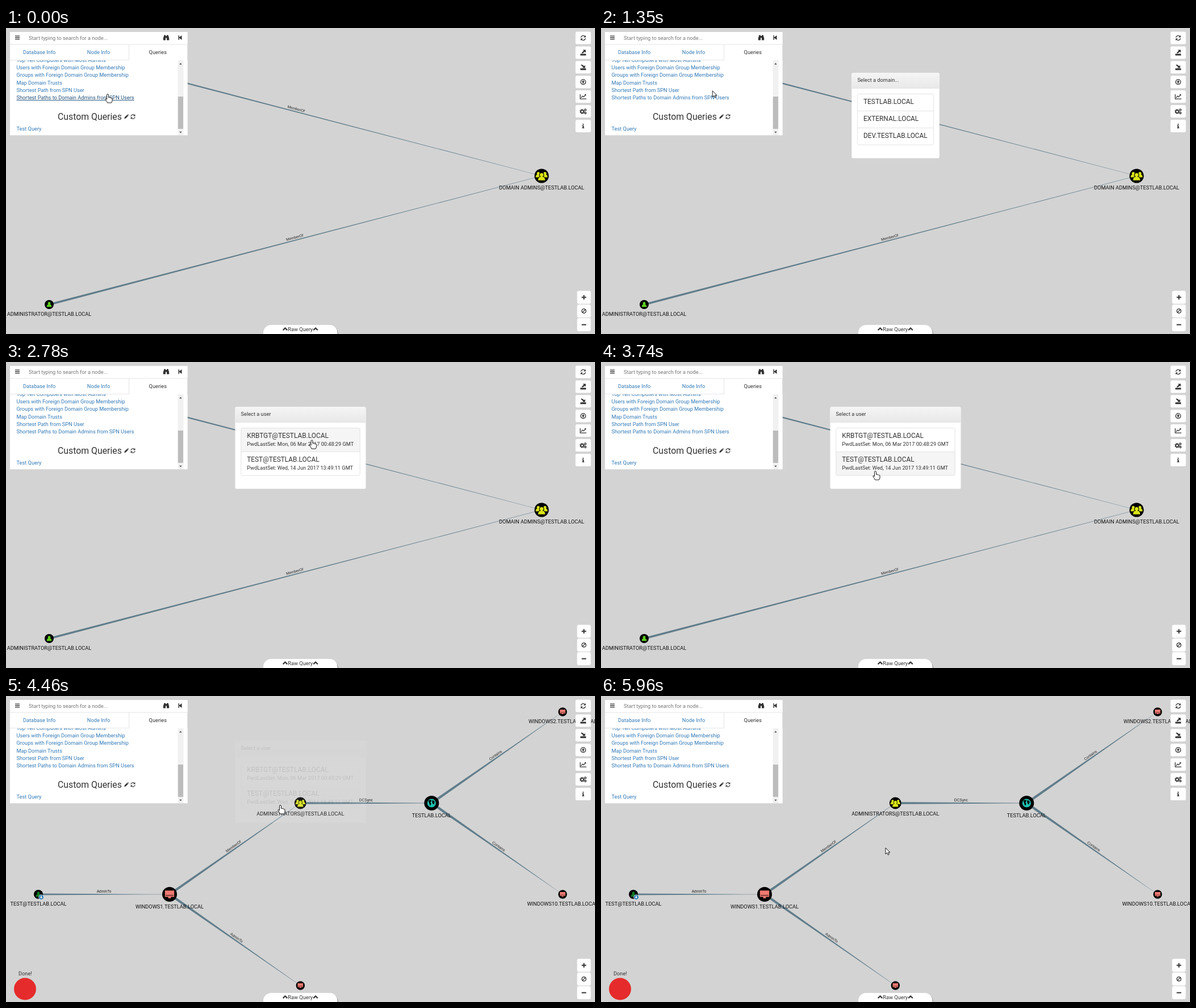
Recreate the animation shown at these times as an HTML page. Size 1037 by 540 pixels, loop 6040 ms.

```html
<!DOCTYPE html>
<html lang="en">
<head>
<meta charset="utf-8">
<title>Graph query</title>
<style>
  html, body { margin: 0; width: 100%; height: 100%; overflow: hidden; background: #d3d3d3; }
  svg { display: block; font: 9.24px Roboto, sans-serif; fill: #333; }
  .mid { text-anchor: middle; }
  .link { fill: #337ab7; }
  .link.hover { fill: #23527c; text-decoration: underline; }
  .edge { fill: #607d8b; }
  .edge-label { font: 6.6px "Liberation Sans", Arial, sans-serif; text-anchor: middle; fill: #222; }
  .node-label { text-anchor: middle; fill: #111; }
  .line { fill: none; stroke: #333; stroke-width: 1.3; }
  .rule { fill: none; stroke: #ddd; stroke-width: .8; }
  .row { fill: #fff; }
  .row.hover { fill: #f5f5f5; }
  .item { font-size: 11.88px; }
  .cursor { fill: #fff; stroke: #000; stroke-width: .9; stroke-linejoin: round; }
</style>
</head>
<body>
<svg id="stage" width="1037" height="540" viewBox="0 0 1037 540">
  <defs>
    <linearGradient id="head" x2="0" y2="1"><stop stop-color="#f5f5f5"/><stop offset="1" stop-color="#e8e8e8"/></linearGradient>
    <clipPath id="list"><rect x="7" y="57" width="295" height="132"/></clipPath>
  </defs>
  <rect width="1037" height="540" fill="#d3d3d3"/>
  <g id="before"></g>
  <g id="after"></g>
  <g id="panel"></g>
  <g id="controls"></g>
  <g id="domains"></g>
  <g id="users"></g>
  <path id="hand" class="cursor" d="M-1.5 1.2Q-1.5-.3 0-.3 1.5-.3 1.5 1.2V5.5Q3 4.6 4 6 5.6 5.2 6.4 6.8 8 6.2 8 8V11Q8 13 6.5 15H-.5Q-1.5 12.5-4 9.2-4.6 7.6-2.8 7.8L-1.5 9z"/>
  <path id="arrow" class="cursor" d="M0 0V11L2.6 8.6 4.4 12.4 6.2 11.6 4.5 8H8z"/>
</svg>
<script>
const LOOP = 6040, DOMAIN_PICKED = 2140, GRAPH_SWAP = 4210;
const $ = id => document.getElementById(id);

// ---- markup helpers
const at = (x, y, body, extra = '') => `<g transform="translate(${x} ${y}) ${extra}">${body}</g>`;
const text = (x, y, s, cls = '') => `<text x="${x}" y="${y}" class="${cls}">${s}</text>`;
const rect = (x, y, w, h, attrs = '') => `<rect x="${x}" y="${y}" width="${w}" height="${h}" ${attrs}/>`;
const shape = (d, attrs = '') => `<path d="${d}" ${attrs}/>`;
const stroke = d => shape(d, 'class="line"');
const disc = (x, y, r, attrs = '') => `<circle cx="${x}" cy="${y}" r="${r}" ${attrs}/>`;

// ---- icons, centred on the origin
const person = 'M0-5a2.6 2.6 0 0 1 1.7 4.6Q4.6 0 4.6 4.5H-4.6Q-4.6 0-1.7-.4A2.6 2.6 0 0 1 0-5z';
const icon = {
  refresh: stroke('M-4-.6A4 4 0 0 1 3-2.7M4 .6A4 4 0 0 1-3 2.7') + shape('M4.4-4.8V-1H.6zM-4.4 4.8V1H-.6z'),
  exportTo: shape('M-5 2H5V5H-5zM4.5-5V.2L2.8-1.4-1.4 1.6-2.8.2 1-3.2-.6-5z'),
  importFrom: shape('M-5 2H5V5H-5zM3.5 1.2H-1.6L0-.4-4-3.5-2.6-5 1.8-2 3.5-3.6z'),
  upload: disc(0, 0, 4.4, 'class="line"') + shape('M0-3L2.8.2H.8V2.8H-.8V.2H-2.8z'),
  chart: stroke('M-5.2-4.2V4H5.6M-3.6 2L-1-1 .8.6 4-3') + shape('M5-4.2V-1.2L2-4.2z'),
  cogs: disc(-1.8, .4, 2.5, 'class="line" style="stroke-width:1.8"') +
    disc(-1.8, .4, 3.8, 'class="line" stroke-dasharray="1.5 1.5"') +
    disc(3.8, -2.6, 1.5, 'class="line"') + disc(3.8, 3, 1.5, 'class="line"'),
  info: shape('M-1-4H1V-2.2H-1zM-1.8-1.2H1V2.8H1.9V4H-1.9V2.8H-1V0H-1.8z'),
  plus: shape('M-4-1H-1V-4H1V-1H4V1H1V4H-1V1H-4z'),
  ban: disc(0, 0, 3.7, 'class="line"') + stroke('M-2.6 2.6L2.6-2.6'),
  minus: shape('M-4-1H4V1H-4z'),
  menu: shape('M-4-3.6H4V-2.2H-4zM-4-.7H4V.7H-4zM-4 2.2H4V3.6H-4z'),
  binoculars: shape('M-3.6-4.5H-1V-3H1V-4.5H3.6L5.2 1V4.5H1V.5H-1V4.5H-5.2V1z'),
  stepBack: shape('M-3-4H-1.6V-.4L3-4V4L-1.6.4V4H-3z'),
  pencil: shape('M-4 4L-3.3 1.2 1.6-3.7 3.7-1.6-1.2 3.3zM2.2-4.2L3-5 5-3 4.2-2.2z'),
  chevron: shape('M0-3L4.6 1.4 3 3 0 0-3 3-4.6 1.4z'),
  user: shape(person),
  users: at(-4, -1.4, shape(person), 'scale(.68)') + at(4, -1.4, shape(person), 'scale(.68)') +
    shape(person, 'stroke="#000" stroke-width=".7" transform="translate(0 1.2)"'),
  desktop: shape('M-5.4-4.4H5.4V3H1.4L1.8 4.6H-1.8L-1.4 3H-5.4z') + shape('M-4.6 1.2H4.6', 'stroke="#000" stroke-width=".6"'),
  globe: disc(0, 0, 5) + shape('M-3.8-2.8Q-1-4.4 0-2.8L-1.4-.8-.4 1-1.8 3.2-3-.6zM1-3.6L3.6-2 2.8 1.6 1.2.6.6-1.6z', 'fill="#000"'),
};

// ---- graph parts
function edge([x1, y1], [x2, y2], label, width) {
  const angle = Math.atan2(y2 - y1, x2 - x1) * 180 / Math.PI, half = Math.hypot(x2 - x1, y2 - y1) / 2;
  return at((x1 + x2) / 2, (y1 + y2) / 2,
    shape(`M${-half} ${-width / 2}L${half}-.15V.15L${-half} ${width / 2}z`, 'class="edge"') +
    text(0, -2.8, label, 'edge-label'), `rotate(${angle})`);
}
const node = ([x, y], r, kind, color, label) =>
  at(x, y, disc(0, 0, r, 'fill="#000"') + `<g fill="${color}" transform="scale(${r / 8.6})">${icon[kind]}</g>` +
    text(0, r + 11.8, label, 'node-label'));

const YELLOW = '#dbe617', GREEN = '#5fd01e', CORAL = '#f07a72';
const admins = [943, 261], admin = [76, 488], hidden = [76, 34];
$('before').innerHTML =
  edge(hidden, admins, 'MemberOf', 3.4) + edge(admin, admins, 'MemberOf', 3.4) +
  node(admins, 12.6, 'users', YELLOW, 'DOMAIN ADMINS@TESTLAB.LOCAL') +
  node(admin, 8, 'user', GREEN, 'ADMINISTRATOR@TESTLAB.LOCAL');

const test = [57, 350], win1 = [288, 350], group = [518.3, 189], domain = [749.3, 189],
  win2 = [980, 28], win10 = [980, 350], bottom = [518.3, 511];
$('after').innerHTML =
  edge(test, win1, 'AdminTo', 3.2) + edge(win1, group, 'MemberOf', 4.4) + edge(win1, bottom, 'AdminTo', 4.4) +
  edge(group, domain, 'DCSync', 3.8) + edge(domain, win2, 'Contains', 4.4) + edge(domain, win10, 'Contains', 4.4) +
  node(test, 8, 'user', '#127a22', 'TEST@TESTLAB.LOCAL') +
  at(62, 355, disc(0, 0, 4.3, 'fill="#2b7bb0" stroke="#cfe3ee" stroke-width=".8"') +
    shape('M-.8-2.6H.8V0H2.2L0 2.6-2.2 0H-.8z', 'fill="#fff"')) +
  node(win1, 13, 'desktop', CORAL, 'WINDOWS1.TESTLAB.LOCAL') +
  node(group, 10.4, 'users', YELLOW, 'ADMINISTRATORS@TESTLAB.LOCAL') +
  node(domain, 13, 'globe', '#1fc4b0', 'TESTLAB.LOCAL') +
  node(win2, 7.7, 'desktop', CORAL, 'WINDOWS2.TESTLAB.LOCAL') +
  node(win10, 7.7, 'desktop', CORAL, 'WINDOWS10.TESTLAB.LOCAL') +
  node(bottom, 7.7, 'desktop', CORAL, '') +
  text(22, 492.5, 'Done!') + disc(33.5, 517, 19.5, 'fill="#e52b2b"');

// ---- search panel
const queries = ['Top Ten Computers with Most Admins', 'Users with Foreign Domain Group Membership',
  'Groups with Foreign Domain Group Membership', 'Map Domain Trusts', 'Shortest Path from SPN User',
  'Shortest Paths to Domain Admins from SPN Users'];
const ROW = 13.2, FIRST_ROW = 56.8;
$('panel').innerHTML =
  rect(7, 7, 312.7, 182.3, 'fill="#fff"') +
  at(20, 17, icon.menu) + at(282, 17, icon.binoculars) + at(306.5, 17, icon.stepBack) +
  '<g fill="#777">' + text(40, 21.4, 'Start typing to search for a node...') + '</g>' +
  shape('M7 29H319.5M7 56.7H216.5V29M319.3 29V57', 'class="rule"') +
  text(58.7, 46, 'Database Info', 'mid link') + text(163, 46, 'Node Info', 'mid link') + text(267.3, 46, 'Queries', 'mid') +
  '<g clip-path="url(#list)">' +
  queries.map((q, i) => text(18.5, FIRST_ROW + i * ROW + 3.2, q, 'link query')).join('') +
  text(18.5, 181, 'Test Query', 'link') + '</g>' +
  `<g font-size="15.84">${text(91, 161.7, 'Custom Queries')}</g>` +
  at(211.8, 156.5, icon.pencil, 'scale(.9)') + at(223.5, 156.5, icon.refresh, 'scale(.9)') +
  rect(302.5, 57, 10, 132, 'fill="#f1f1f1"') + rect(302.8, 121, 9.2, 57, 'fill="#bcbcbc"') +
  shape('M307.4 61.5L309.6 64.5H305.2zM307.4 185.5L309.6 182.7H305.2z', 'fill="#505050"');

// ---- buttons around the stage
const toolbar = ['refresh', 'exportTo', 'importFrom', 'upload', 'chart', 'cogs', 'info'];
const zoom = ['plus', 'ban', 'minus'];
$('controls').innerHTML =
  toolbar.map((k, i) => at(1016.2, 17.5 + i * 25.9, rect(-13.5, -11, 27, 22, 'rx="2.5" fill="#fff"') + icon[k])).join('') +
  zoom.map((k, i) => at(1017.5, 475.2 + i * 24.2, rect(-12, -11.5, 24, 23, 'rx="3" fill="#fff"') + icon[k])).join('') +
  rect(454.2, 525.2, 130.4, 40, 'rx="14" fill="#777"') + rect(453, 524, 130.6, 40, 'rx="14" fill="#fff"') +
  at(491.5, 531, icon.chevron) + at(545, 531, icon.chevron) + text(518.3, 535, 'Raw Query', 'mid');

// ---- dialogs
function dialog(id, x, width, height, title, rowHeight, rows) {
  const left = x + 10.3, listWidth = width - 20.6, listHeight = rowHeight * rows.length;
  $(id).innerHTML =
    rect(x, 79.3, width, height, 'rx="2.5" fill="#fff"') +
    rect(x, 79.3, width, 27, 'rx="2.5" fill="url(#head)"') +
    shape(`M${x} 106.5h${width}`, 'class="rule"') + text(left - .2, 95.4, title) +
    rows.map(([name, note], i) => {
      const y = 116.5 + i * rowHeight;
      return rect(left, y, listWidth, rowHeight, 'class="row"') +
        (i ? shape(`M${left} ${y}h${listWidth}`, 'class="rule"') : '') +
        text(left + 10.4, y + 17.4, name, 'item') + (note ? text(left + 10.4, y + 31.8, note) : '');
    }).join('') +
    rect(left, 116.5, listWidth, listHeight, 'rx="2.5" class="rule"');
}
dialog('domains', 441.3, 154.5, 150.5, 'Select a domain...', 29.9,
  [['TESTLAB.LOCAL'], ['EXTERNAL.LOCAL'], ['DEV.TESTLAB.LOCAL']]);
dialog('users', 403.5, 230, 144.4, 'Select a user', 41.9, [
  ['KRBTGT@TESTLAB.LOCAL', 'PwdLastSet: Mon, 06 Mar 2017 00:48:29 GMT'],
  ['TEST@TESTLAB.LOCAL', 'PwdLastSet: Wed, 14 Jun 2017 13:49:11 GMT']]);

// ---- motion
const path = [[0, 179, 117], [30, 179, 117], [320, 120, 105], [1230, 120, 105], [1900, 542, 137], [2750, 542, 137],
  [3100, 503, 150], [3250, 492, 163], [3540, 488, 172], [3740, 483, 193], [4620, 483, 193], [5080, 501, 267],
  [5640, 501, 267], [5960, 501, 268], [LOOP, 501, 268]];
const ramp = (t, from, to) => Math.min(1, Math.max(0, (t - from) / (to - from)));

function pointer(t) {
  const i = path.findIndex(p => p[0] > t), [t1, x1, y1] = path[i - 1], [t2, x2, y2] = path[i];
  const k = ramp(t, t1, t2);
  return [x1 + (x2 - x1) * k, y1 + (y2 - y1) * k];
}

const links = [...document.querySelectorAll('.query')];

function draw(now) {
  const t = now % LOOP, [x, y] = pointer(t);
  const fadeIn = ramp(t, 720, 1190), fadeOut = 1 - ramp(t, 4050, 4510);
  const opacity = { domains: t < DOMAIN_PICKED ? fadeIn : 0, users: t < DOMAIN_PICKED ? 0 : fadeOut };
  $('before').style.display = t < GRAPH_SWAP ? '' : 'none';
  $('after').style.display = t < GRAPH_SWAP ? 'none' : '';

  let hovering = false;
  const setHover = (el, on) => { el.classList.toggle('hover', on); hovering ||= on; };
  links.forEach((el, i) => setHover(el,
    Math.abs(y - FIRST_ROW - i * ROW) < ROW / 2 && x > 18 && x < 18.5 + el.getComputedTextLength()));
  for (const id in opacity) {
    $(id).style.opacity = opacity[id];
    for (const el of $(id).querySelectorAll('.row')) {
      const b = el.getBBox();
      setHover(el, opacity[id] > 0 && x > b.x && x < b.x + b.width && y >= b.y && y < b.y + b.height);
    }
  }
  for (const id of ['hand', 'arrow']) {
    $(id).setAttribute('transform', `translate(${x} ${y})`);
    $(id).style.display = (id === 'hand') === hovering ? '' : 'none';
  }
}

const start = performance.now();
(function tick() {
  draw(performance.now() - start);
  requestAnimationFrame(tick);
})();
</script>
</body>
</html>
```
